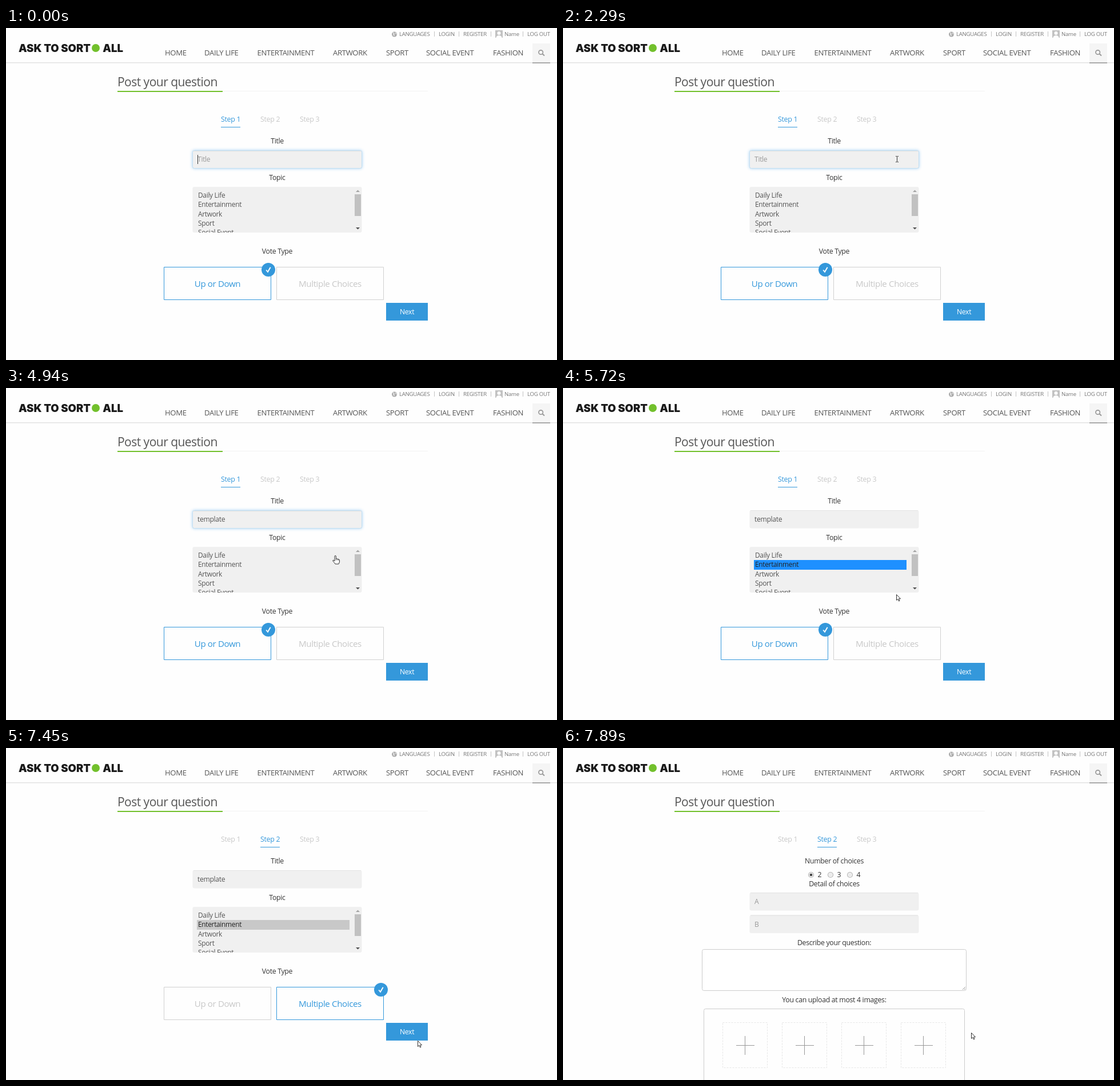
Animation of 964x581 px, one loop 8 s. Source, as an HTML page with a canvas:

```html
<!DOCTYPE html>
<html lang="en">
<head>
<meta charset="utf-8">
<title>Post your question</title>
<style>
html, body { margin: 0; width: 100%; height: 100%; overflow: hidden; background: #fefefe; }
canvas { display: block; }
</style>
</head>
<body>
<canvas id="stage" width="964" height="581"></canvas>
<script>
const ctx = document.getElementById('stage').getContext('2d');
const LOOP = 8000;
const BLUE = '#3498db', DARK = '#333', MUTED = '#c8c8c8', FIELD = '#f0f0f0';
const SANS = '"Open Sans", "Noto Sans", sans-serif';

const TICKS = [0, 120, 600, 760, 910, 1060, 1210, 1680, 2290, 2440, 2750, 2930, 3240,
  3700, 3850, 3990, 4450, 4610, 4940, 5090, 5240, 5400, 5550, 5700, 5860, 6010, 6170,
  6330, 6480, 6640, 6810, 6990, 7130, 7290, 7450, 7590, 7740, 7890];

// Pointer path: time, x, y.
const PATH = [[600, 664, 403], [910, 607, 285], [1060, 586, 233], [1210, 584, 229],
  [4450, 584, 229], [4610, 582, 283], [4940, 576, 294], [5240, 573, 309], [5400, 573, 309],
  [5860, 588, 388], [6330, 621, 462], [6480, 621, 462], [6810, 750, 511], [6990, 738, 508],
  [7290, 722, 505], [7450, 720, 512], [7590, 720, 512], [7890, 714, 498]];

const TYPING = [[2440, 2], [2750, 3], [2930, 4], [3240, 5], [3700, 6], [3850, 7], [3990, 8]];
const CARET = [[0, 120], [600, 1210], [1680, 2290], [2440, 4450]];
const CLICKS = [5240, 6330, 7290];
const PICK = 5240, BLUR = 6330, SWITCH = 6480, NEXT = 7450;
const FLIP = 7466, FLIP_MS = 400, FLIP_Y = 187;

const within = (v, a, b) => v >= a && v < b;

function text(str, x, y, size, color, align = 'left', weight = 400) {
  ctx.font = `${weight} ${size}px ${SANS}`;
  ctx.letterSpacing = `${-0.025 * size}px`;
  ctx.textAlign = align;
  ctx.fillStyle = color;
  ctx.fillText(str, x, Math.round(y + size * 0.36));
}

function rect(x, y, w, h, color) {
  ctx.fillStyle = color;
  ctx.fillRect(x, y, w, h);
}

function disc(x, y, r, color) {
  ctx.fillStyle = color;
  ctx.beginPath();
  ctx.arc(x, y, r, 0, 7);
  ctx.fill();
}

function box(x, y, w, h, r, fill, stroke) {
  ctx.beginPath();
  ctx.roundRect(x, y, w, h, r);
  if (fill) { ctx.fillStyle = fill; ctx.fill(); }
  if (stroke) { ctx.strokeStyle = stroke; ctx.lineWidth = 1; ctx.stroke(); }
}

function line(color, width, ...pts) {
  ctx.strokeStyle = color;
  ctx.lineWidth = width;
  ctx.beginPath();
  for (let i = 0; i < pts.length; i += 2) ctx.lineTo(pts[i], pts[i + 1]);
  ctx.stroke();
}

function triangle(x, y, dy, color) {
  ctx.fillStyle = color;
  ctx.beginPath();
  ctx.moveTo(x - 3.5, y);
  ctx.lineTo(x + 3.5, y);
  ctx.lineTo(x, y + dy);
  ctx.fill();
}

function brand() {
  ctx.font = '900 18.5px Inter, "Liberation Sans", sans-serif';
  ctx.letterSpacing = '0px';
  ctx.fillStyle = '#1a1a1a';
  ctx.textAlign = 'right';
  ctx.fillText('ASK TO SORT', 148, 42);
  ctx.fillText('ALL', 205, 42);
  disc(157, 35, 7, '#72c02c');
}

function header() {
  brand();
  const nav = [['HOME', 278], ['DAILY LIFE', 347], ['ENTERTAINMENT', 439.5], ['ARTWORK', 572],
    ['SPORT', 665], ['SOCIAL EVENT', 735], ['FASHION', 852]];
  for (const [label, x] of nav) text(label, x, 43.5, 13.1, '#555');

  const links = [['LANGUAGES', 688], ['LOGIN', 757], ['REGISTER', 800], ['Name', 872], ['LOG OUT', 912]];
  for (const [label, x] of links) text(label, x, 10.8, 9.6, '#777');
  for (const x of [749, 792, 848, 904]) rect(x, 6, 1, 9, '#c4c4c4');

  disc(679.5, 11, 4.5, '#aaa');
  line('#eee', 1.5, 677, 8, 679, 10, 678, 12, 680, 13);
  line('#eee', 1.2, 681, 8, 683, 11);

  rect(856, 4, 13, 13, '#c2c2c2');
  disc(862.5, 9, 3, '#fff');
  ctx.beginPath();
  ctx.ellipse(862.5, 17, 5, 4, 0, Math.PI, 0);
  ctx.fill();

  rect(0, 60, 964, 1, '#e2e2e2');
  rect(0, 61, 964, 1, '#f0f0f0');
  rect(921, 27, 31, 33, '#f5f5f5');
  rect(921, 60, 31, 2, '#aaa');
  ctx.strokeStyle = '#999';
  ctx.lineWidth = 1.7;
  ctx.beginPath();
  ctx.arc(935.7, 42.5, 3.7, 0, 7);
  ctx.stroke();
  line('#999', 2, 938.5, 45.3, 942, 48.5);

  text('Post your question', 195, 94, 21, '#555');
  rect(195, 110, 543, 1, '#f3f3f3');
  rect(195, 110, 184, 2, '#72c02c');
}

function steps(active) {
  [376, 445, 514].forEach((x, i) => {
    const on = i === active;
    text(`Step ${i + 1}`, x, 160, 12.4, on ? BLUE : MUTED);
    if (on) rect(x, 173, 34, 1, BLUE);
  });
}

function label(str, y) {
  text(str, 474.5, y, 12.3, DARK, 'center');
}

function field(y, focused) {
  if (focused) {
    ctx.save();
    ctx.shadowColor = 'rgba(82,168,236,.45)';
    ctx.shadowBlur = 5;
    box(326.5, y + .5, 296, 31, 3, FIELD, '#c3dff2');
    ctx.restore();
  }
  box(326.5, y, 296, 31.5, 3, FIELD);
  if (focused) box(326.5, y + .5, 296, 31, 3, null, '#c3dff2');
  rect(328, y + (focused ? 1 : 0), 293, 1, '#e2e2e2');
}

function button(str, x, w, y) {
  rect(x, y, w, 31, BLUE);
  text(str, x + w / 2, y + 15.5, 12.2, '#fff', 'center');
}

function titleField(t) {
  field(214, t < PICK);
  let typed = 0;
  for (const [at, n] of TYPING) if (t >= at) typed = n;
  const value = 'template'.slice(0, typed);
  text(value || 'Title', 335, 229.5, 12.1, typed ? '#555' : '#999');
  if (CARET.some(([a, b]) => within(t, a, b))) {
    const w = value ? ctx.measureText(value).width : 0;
    rect(Math.round(335 + w), 222, 1, 16, DARK);
  }
}

function topicList(t) {
  ctx.save();
  box(326.5, 278, 296, 80, 3, FIELD);
  ctx.clip();
  if (t >= PICK) rect(334, 301, 267, 17, t < BLUR ? '#1e90ff' : '#c8c8c8');
  ['Daily Life', 'Entertainment', 'Artwork', 'Sport', 'Social Event'].forEach((name, i) => {
    const picked = i === 1 && t >= PICK;
    text(name, 336, 293 + i * 16.2, 11.9, picked ? '#222' : '#555');
  });
  triangle(615.5, 287, -3.5, '#a3a3a3');
  triangle(615.5, 349, 3.5, '#505050');
  rect(610, 291, 11, 38, '#c1c1c1');
  ctx.restore();
}

function voteBox(str, x, on) {
  box(x + .5, 418.5, 187, 57, 0, null, on ? BLUE : '#d0d0d0');
  text(str, x + 94, 447.5, 15.1, on ? BLUE : MUTED, 'center');
  if (on) {
    disc(x + 183, 423, 12, BLUE);
    line('#fff', 1.9, x + 179.2, 423.5, x + 182, 426.8, x + 186.7, 418.8);
  }
}

function firstPanel(t) {
  label('Title', 197.6);
  titleField(t);
  label('Topic', 261.6);
  topicList(t);
  label('Vote Type', 390.6);
  voteBox('Up or Down', 276, t < SWITCH);
  voteBox('Multiple Choices', 473, t >= SWITCH);
  button('Next', 665, 73, 481);
}

function radio(x, n, on) {
  disc(x, 222, 5, '#aaa');
  disc(x, 222, 4.2, '#ececec');
  if (on) disc(x, 222, 2.3, '#444');
  text(n, x + 11.5, 221.5, 12.3, DARK);
}

function secondPanel() {
  label('Number of choices', 197.6);
  [2, 3, 4].forEach((n, i) => radio(434 + i * 34, n, i === 0));
  label('Detail of choices', 237.6);
  field(253, false);
  field(292.5, false);
  text('A', 335, 269, 12.1, '#999');
  text('B', 335, 309, 12.1, '#999');
  label('Describe your question:', 340.6);
  box(243.5, 352.5, 462, 72, 3, '#fff', '#ccc');
  line('#999', 1, 699, 423, 704, 418);
  line('#999', 1, 702, 423, 704, 421);
  label('You can upload at most 4 images:', 440.6);
  box(246.5, 456.5, 456, 130, 3, null, '#ccc');
  for (let i = 0; i < 4; i++) {
    const x = 279 + i * 104;
    ctx.setLineDash([3, 2]);
    box(x + .5, 480.5, 78, 79, 0, null, '#e6e6e6');
    ctx.setLineDash([]);
    line('#999', 1, x + 24, 520.5, x + 56, 520.5);
    line('#999', 1, x + 39.5, 504, x + 39.5, 537);
  }
  button('Previous', 211, 93, 597);
  button('Next', 667, 71, 597);
}

function flipped(scale, draw) {
  if (scale <= 0) return;
  ctx.save();
  ctx.globalAlpha = scale;
  ctx.translate(0, FLIP_Y * (1 - scale));
  ctx.scale(1, scale);
  draw();
  ctx.restore();
}

function pointerAt(t) {
  if (t < PATH[0][0]) return null;
  for (let i = 1; i < PATH.length; i++) {
    const [a, ax, ay] = PATH[i - 1], [b, bx, by] = PATH[i];
    if (t <= b) {
      const k = (t - a) / (b - a);
      return [Math.round(ax + (bx - ax) * k), Math.round(ay + (by - ay) * k)];
    }
  }
  return PATH[PATH.length - 1].slice(1);
}

function cursorKind(x, y, t) {
  if (t >= NEXT) return 'arrow';
  if (within(x, 327, 622) && within(y, 214, 246)) return 'beam';
  const hot = within(x, 327, 610) && within(y, 278, 358)
    || within(y, 418, 476) && (within(x, 276, 464) || within(x, 473, 661))
    || within(x, 665, 738) && within(y, 481, 512);
  return hot ? 'hand' : 'arrow';
}

const SHAPES = {
  arrow: new Path2D('M.5 .5V10.5L2.8 8.4L4.5 12L6 11.3L4.5 7.8H7.5Z'),
  hand: new Path2D('M-1 9V1Q-1-.7 .2-.7T1.4 1V5Q3 4 3.8 5.3Q5.2 4.6 6 6Q7.5 5.6 7.5 7.5V10Q7 12 6 14H0Q-1.5 11.5-4 9Q-4.6 7.2-3 7.2Z'),
  beam: new Path2D('M-2.5-5H-.7L0-4.3L.7-5H2.5M0-4.3V4.3M-2.5 5H-.7L0 4.3L.7 5H2.5')
};

function pointer(t) {
  const at = pointerAt(t);
  if (!at) return;
  const [x, y] = at, kind = cursorKind(x, y, t);
  if (CLICKS.includes(t)) disc(x, y, 8, 'rgba(255,242,0,.6)');
  ctx.save();
  ctx.translate(x, y);
  if (kind !== 'beam') {
    ctx.fillStyle = '#fff';
    ctx.fill(SHAPES[kind]);
  } else {
    ctx.translate(.5, .5);
  }
  ctx.strokeStyle = '#333';
  ctx.lineWidth = 1;
  ctx.stroke(SHAPES[kind]);
  if (kind === 'hand') {
    line('#333', .8, 1.4, 4.5, 1.4, 7.5);
    line('#333', .8, 3.7, 5.3, 3.7, 7.5);
    line('#333', .8, 5.8, 6, 5.8, 8);
  }
  ctx.restore();
}

function draw(now) {
  const clock = now % LOOP;
  const t = TICKS.findLast(tick => tick <= clock) ?? 0;
  rect(0, 0, 964, 581, '#fefefe');
  header();
  steps(t < NEXT ? 0 : 1);
  const k = Math.min(1, Math.max(0, (t - FLIP) / FLIP_MS));
  const p = .5 - Math.cos(Math.PI * k) / 2;
  flipped(p, secondPanel);
  flipped(1 - p, () => firstPanel(t));
  pointer(t);
}

const start = performance.now();
function frame() {
  draw(performance.now() - start);
  requestAnimationFrame(frame);
}
frame();
</script>
</body>
</html>
```
